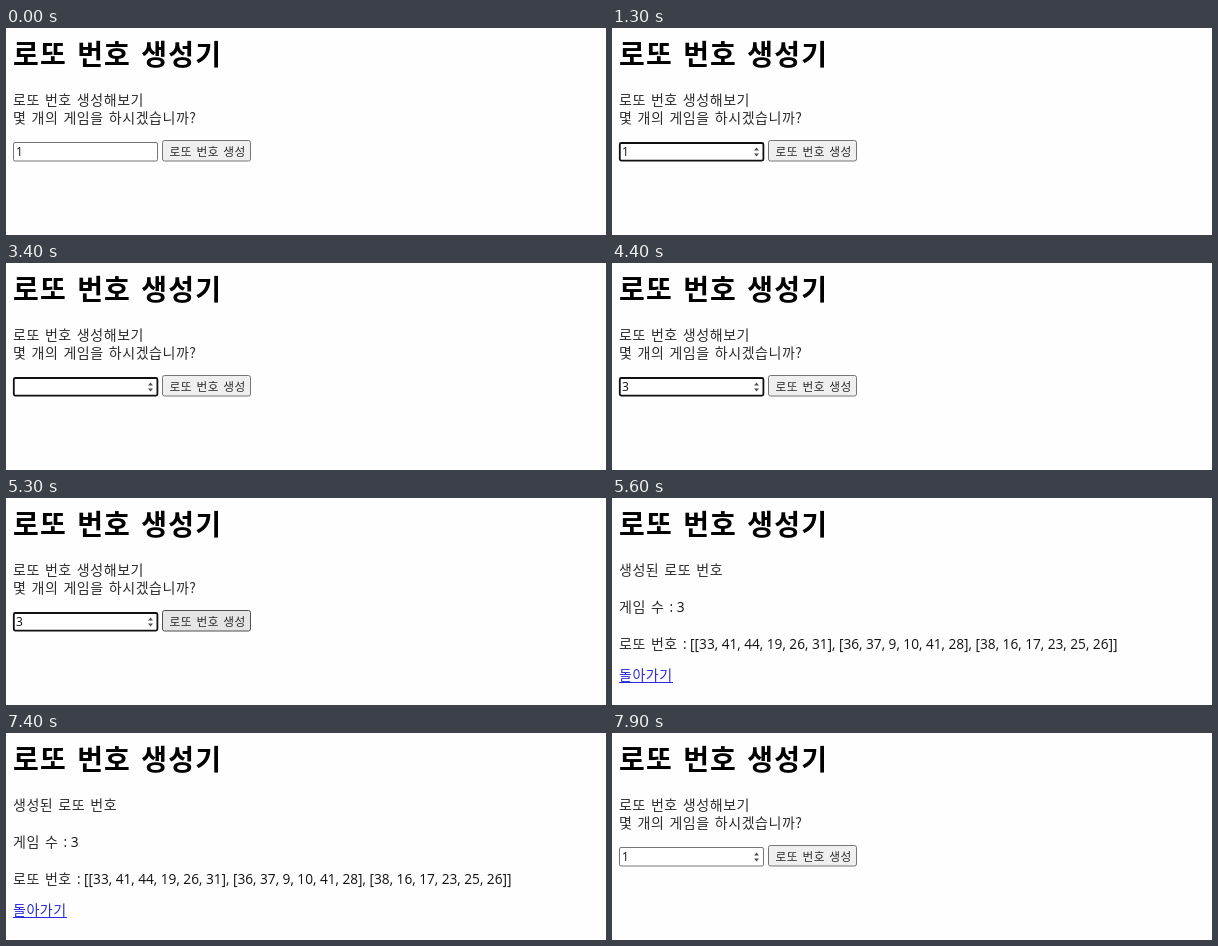
Recreate the animation shown at these times as an HTML page. Size 600 by 207 pixels, loop 8 s.

```html
<!DOCTYPE html>
<html lang="ko">
<meta charset="utf-8">
<title>로또 번호 생성기</title>
<style>
  html, body { margin: 0; width: 100%; height: 100%; overflow: hidden; background: #fefefe; }
  svg { display: block; width: 600px; height: 207px; }
  text { font: 14px "Noto Sans CJK KR", "Noto Sans CJK", sans-serif; letter-spacing: .55px; word-spacing: .6px; fill: #2c2c2c; white-space: pre; }
  .title { font-size: 28px; font-weight: 700; letter-spacing: 1.2px; word-spacing: 1.2px; fill: #000; }
  .small { font-size: 11.7px; letter-spacing: .5px; }
  .latin { font: 13.7px "Open Sans", "Noto Sans", sans-serif; letter-spacing: 0; word-spacing: 0; fill: #111; }
  #value { font-size: 12px; }
  .link { fill: #2a2ae0; }
</style>
<svg viewBox="0 0 600 207">
  <text class="title" x="7" y="36.5">로또 번호 생성기</text>
  <g id="form">
    <text x="7" y="76.5">로또 번호 생성해보기</text>
    <text x="7" y="94.5">몇 개의 게임을 하시겠습니까?</text>
    <rect id="field" fill="#fff"/>
    <text id="value" class="latin" x="10" y="128"></text>
    <path id="caret" d="M0 118.5v11" stroke="#000"/>
    <path id="spinner" d="M142 122.5l2.5-3 2.5 3zM142 125.5l2.5 3 2.5-3z" fill="#505050"/>
    <rect id="button" x="156.5" y="112.5" width="88" height="20.5" rx="2"/>
    <text class="small" x="163.5" y="127.5">로또 번호 생성</text>
  </g>
  <g id="result">
    <text x="7" y="76.5">생성된 로또 번호</text>
    <text x="7" y="113.5">게임 수 <tspan class="latin">: 3</tspan></text>
    <text x="7" y="150.5">로또 번호 <tspan class="latin">: [[33, 41, 44, 19, 26, 31], [36, 37, 9, 10, 41, 28], [38, 16, 17, 23, 25, 26]]</tspan></text>
    <text class="link" x="7" y="182">돌아가기</text>
    <path d="M7 184.5h54" stroke="#2a2ae0"/>
  </g>
</svg>
<script>
  const LOOP = 8000;
  const HOVER = 500, FOCUS = 700, ERASE = 1800, TYPE = 3700, AIM = 4800, SUBMIT = 5500, BACK = 7600;
  const $ = id => document.getElementById(id);
  const set = (id, attrs) => {
    for (const key in attrs) $(id).setAttribute(key, attrs[key]);
  };
  const show = (id, on) => set(id, { visibility: on ? 'inherit' : 'hidden' });

  function draw(t) {
    const onResult = t >= SUBMIT && t < BACK;
    const focused = t >= FOCUS && t < SUBMIT;
    const aimed = t >= AIM && t < SUBMIT;
    const value = t >= BACK || t < ERASE ? '1' : t < TYPE ? '' : '3';
    const lastInput = t < ERASE ? FOCUS : t < TYPE ? ERASE : TYPE;

    show('form', !onResult);
    show('result', onResult);
    show('spinner', t >= HOVER);
    show('caret', focused && (t - lastInput) % 1000 < 500);
    set('caret', { transform: `translate(${value ? 17.5 : 10.5} 0)` });
    $('value').textContent = value;
    set('field', focused
      ? { x: 7.8, y: 115, width: 143.6, height: 17.6, rx: 1.5, stroke: '#101010', 'stroke-width': 1.8 }
      : { x: 7.5, y: 114.5, width: 144, height: 18.5, rx: 1.5, stroke: '#767676', 'stroke-width': 1 });
    set('button', { fill: aimed ? '#e5e5e5' : '#efefef', stroke: aimed ? '#4f4f4f' : '#767676' });
  }

  function tick() {
    draw(performance.now() % LOOP);
    requestAnimationFrame(tick);
  }
  tick();
</script>
</html>
```
